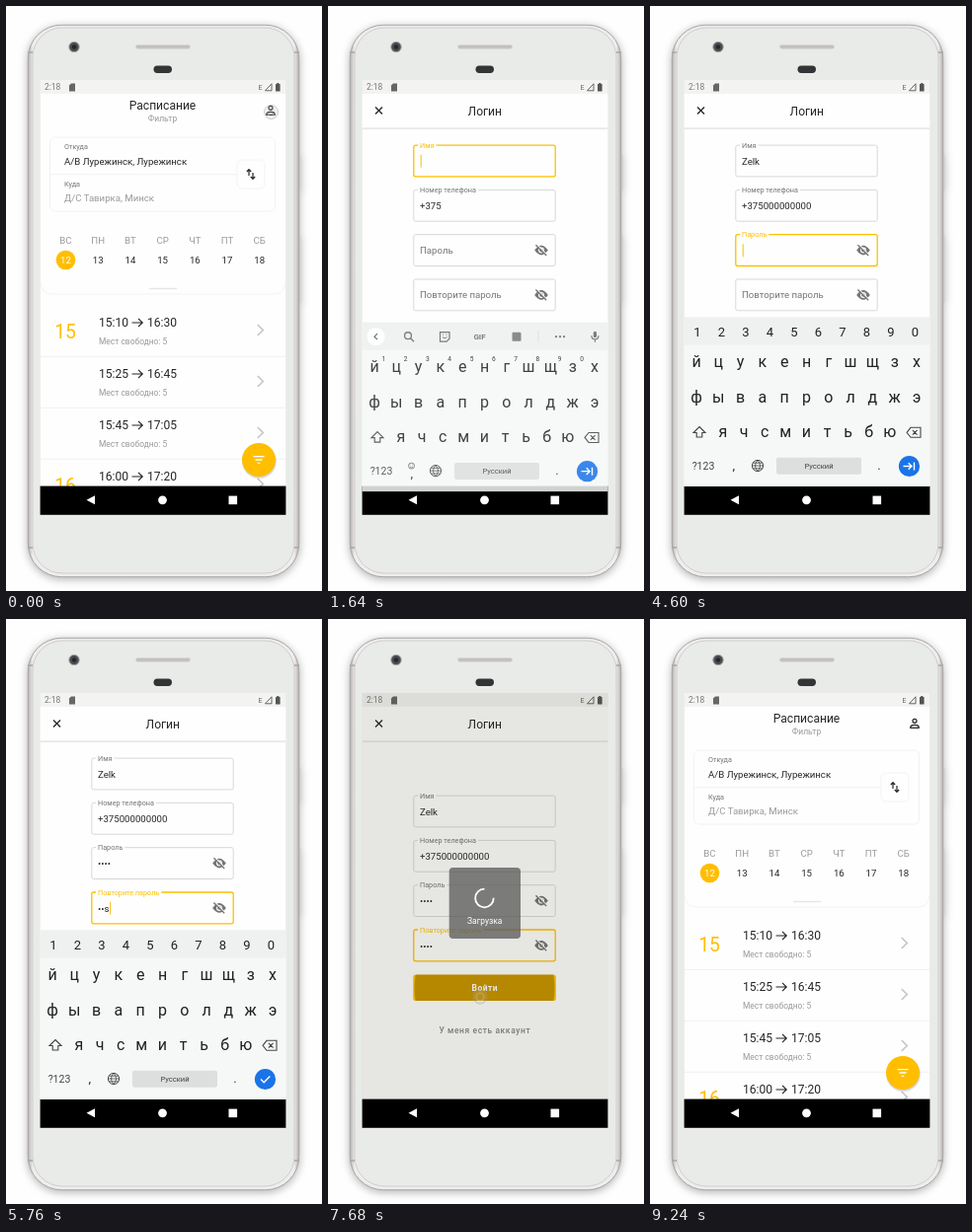
An HTML page for the animation above (10 s loop, 320 px wide and 593 px high).

```html
<!DOCTYPE html>
<html lang="ru">
<head>
<meta charset="utf-8">
<title>Расписание</title>
<style>
html, body { margin: 0; width: 100%; height: 100%; overflow: hidden; background: #fdfefd; }
svg { display: block; width: 100%; height: 100%; font-family: Roboto, sans-serif; }
#body { filter: drop-shadow(0 2px 4px rgba(0,0,0,.3)); }
</style>
</head>
<body>
<svg viewBox="0 0 320 593">
  <defs>
    <clipPath id="screen"><rect x="34.6" y="75" width="248.8" height="412"/></clipPath>
    <clipPath id="button"><rect x="86.3" y="360.5" width="144.5" height="26.5" rx="2.5"/></clipPath>
    <linearGradient id="rim">
      <stop offset="0" stop-color="#b5b0b0"/><stop offset=".018" stop-color="#efeded"/>
      <stop offset=".982" stop-color="#efeded"/><stop offset="1" stop-color="#b5b0b0"/>
    </linearGradient>
  </defs>
  <g id="body">
    <path d="M296.5 151V186M296.5 233V300" stroke="#d2d0d0" stroke-width="4"/>
    <rect x="22.3" y="19.3" width="274.4" height="559.4" rx="34" fill="url(#rim)" stroke="#aaa5a5"/>
  </g>
  <rect x="27" y="22" width="265" height="553" rx="30" fill="#e9ebe8" stroke="#d0cdcd"/>
  <path d="M22 47h5M292 47h5M22 549h5M292 549h5" stroke="#aaa6a6" stroke-width="1.5"/>
  <rect x="131.5" y="39.6" width="55" height="3.6" rx="1.8" fill="#c2bfbe" stroke="#d6d4d3" stroke-width=".8"/>
  <circle cx="69" cy="41.5" r="5.2" fill="#4c4b4d" stroke="#aaa"/><circle cx="69" cy="41.5" r="2.2" fill="#242833"/>
  <rect x="149.5" y="60.5" width="18.5" height="7.5" rx="3.7" fill="#343436"/>
  <g id="live"></g>
</svg>
<script>
const AMBER = '#ffbe00', INK = '#262626', GREY = '#757575', BLUE = '#1a73e8', PAPER = '#fefefe';
const live = document.getElementById('live');
const pen = document.createElement('canvas').getContext('2d');

const ramp = (t, start, span) => Math.min(1, Math.max(0, (t - start) / span));
const mix = (a, b, p) => a + (b - a) * p;
const easeOut = (p, n) => 1 - (1 - p) ** n;
const typed = (str, times, t) => str.slice(0, times.filter(k => t >= k).length);

const text = (x, y, size, str, fill = INK, anchor = 'start', more = '') =>
  `<text x="${x}" y="${y}" font-size="${size}" fill="${fill}" text-anchor="${anchor}" ${more}>${str}</text>`;
const mid = (x, y, size, str, fill, more) => text(x, y, size, str, fill, 'middle', more);
const rect = (x, y, w, h, fill, r = 0, more = '') =>
  `<rect x="${x}" y="${y}" width="${w}" height="${h}" rx="${r}" fill="${fill}" ${more}/>`;
const band = (y, h, fill, more) => rect(34.6, y, 248.8, h, fill, 0, more);
const circle = (x, y, r, fill, more = '') => `<circle cx="${x}" cy="${y}" r="${r}" fill="${fill}" ${more}/>`;
const line = (d, color, width = 1, more = '') =>
  `<path d="${d}" fill="none" stroke="${color}" stroke-width="${width}" ${more}/>`;
const shape = (d, fill) => `<path d="${d}" fill="${fill}"/>`;
const group = (x, y, alpha, inner) => `<g transform="translate(${x} ${y})" opacity="${alpha}">${inner}</g>`;

// ---------- system bars ----------
const statusBar = band(75, 14, '#f3f4f2') + text(39, 85.2, 8.45, '2:18', '#777') +
  shape('M66 78.5H70V86.5H64V80.5Z', '#666') + text(255.5, 85, 7, 'E', '#666') +
  line('M262.5 85.8H269V78.8Z', '#555', .9) + rect(273, 79, 4.6, 7.5, '#555', .6) + rect(274.3, 78, 2, 1.2, '#555');
const navBar = band(486.6, 29.2, '#000') + shape('M81.5 500.8L90 496.3V505.3Z', '#fff') +
  circle(158.5, 500.8, 4.4, '#fff') + rect(225.5, 496.6, 8.6, 8.6, '#fff');

// ---------- schedule ----------
function departure(i) {
  const [from, to, hour] = [['15:10', '16:30', '15'], ['15:25', '16:45'], ['15:45', '17:05'], ['16:00', '17:20', '16']][i];
  return group(0, i * 52, 1,
    (hour ? mid(60, 337, 19.3, hour, AMBER) : '') +
    text(94, 325.3, 12.07, from) + text(143, 325.3, 12.07, to) +
    line('M127.5 321H138M134 316.8L138.2 321L134 325.2', INK, 1.2) +
    text(94, 342.5, 8.45, 'Мест свободно: 5', '#9b9b9b') +
    line('M254.8 323L260.3 328.5L254.8 334', '#c6c6c6', 1.7) + line('M35 355.3H283', '#f1f1f1'));
}
const weekdays = ['ВС', 'ПН', 'ВТ', 'СР', 'ЧТ', 'ПТ', 'СБ'].map((day, i) => {
  const x = 60.5 + i * 32.7;
  return mid(x, 240.6, 9.65, day, '#9a9a9a') + (i ? '' : circle(x, 257.5, 9.8, AMBER)) +
    mid(x, 261, 9.65, 12 + i, i ? INK : '#fff');
}).join('');
const schedule = band(89, 398, PAPER) +
  mid(158.5, 105.3, 12.07, 'Расписание') + mid(158.5, 117.3, 8.45, 'Фильтр', '#9b9b9b') +
  circle(268, 103.3, 2, 'none', `stroke="${INK}" stroke-width="1.2"`) +
  line('M263.8 110.4V109.3Q264.5 107.3 268 107.3T272.2 109.3V110.4Z', INK, 1.2) +
  rect(44.5, 133, 228, 75, 'none', 5, 'stroke="#f2f2f2"') + line('M45 170.8H234', '#f2f2f2') +
  text(59, 145, 7.24, 'Откуда', GREY) + text(59, 160.5, 9.65, 'А/В Лурежинск, Лурежинск') +
  text(59, 182.5, 7.24, 'Куда', GREY) + text(59, 197.8, 9.65, 'Д/С Тавирка, Минск', '#9a9a9a') +
  rect(234, 156, 28, 29, PAPER, 5, 'stroke="#f3f3f3"') +
  line('M246 172V166M243.8 168L246 165.7L248.2 168M250 169V175M247.8 173L250 175.3L252.2 173', INK, 1.2) +
  weekdays + line('M145 286.5H173', '#e6e6e6', 1.4) +
  line('M35 280Q36 292 47 292H271Q282 292 283 280', '#f3f3f3') +
  [0, 1, 2, 3].map(departure).join('') +
  circle(256.5, 462, 17.5, '#000', 'opacity=".08"') + circle(256.3, 461, 17.2, '#000', 'opacity=".1"') +
  circle(256, 460, 17, AMBER) + line('M250.5 456.7H261.5M252.5 460H259.5M254.7 463.3H257.3', '#fff', 1.3);

// ---------- registration form ----------
const eye = shape('M-6.8 0Q0-9.6 6.8 0Q0 9.6-6.8 0Z', GREY) + circle(0, 0, 3, PAPER) + circle(0, 0, 1.8, GREY) +
  line('M-4.6-5.8L6.2 5', PAPER, 1.3) + line('M-5.6-5.4L5.2 5.4', GREY, 1.3);

const FOCUS = [1360, 2760, 4440, 5400, 1e5];
const FIELDS = [
  { label: 'Имя', value: 'Zelk', keys: [1960, 2280, 2400, 2520] },
  { label: 'Номер телефона', value: '+375000000000',
    keys: [0, 0, 0, 0, 3040, 3120, 3200, 3400, 3520, 3680, 3800, 3880, 4000] },
  { label: 'Пароль', value: 'best', keys: [4680, 4800, 4920, 5160], secret: true },
  { label: 'Повторите пароль', value: 'best', keys: [5520, 5640, 5760, 6000], secret: true },
];

function field(i, t) {
  const { label, value, keys, secret } = FIELDS[i];
  const focused = t >= FOCUS[i] && t < FOCUS[i + 1];
  const float = i === 1 ? 1 : easeOut(ramp(t, FOCUS[i] - 20, 167), 2);
  const last = Math.max(FOCUS[i] + 120, ...keys.filter(k => t >= k));
  let shown = typed(value, keys, t);
  if (secret && shown) {
    const plain = focused && t < last + 1500 ? shown.slice(-1) : '';
    shown = '•'.repeat(shown.length - plain.length) + plain;
  }
  pen.font = '7.24px Roboto, sans-serif';
  const gap = pen.measureText(label).width + 4;
  pen.font = '9.65px Roboto, sans-serif';
  const caret = 93.7 + pen.measureText(shown).width;
  const blinkOn = (t - last + 1000) % 1000 < 500;
  const border = focused ? `stroke="${AMBER}" stroke-width="1.3"` : 'stroke="#d4d4d4" stroke-width=".9"';
  return group(0, 195 + i * 45.3, 1,
    rect(86.8, -15.9, 143.4, 31.8, 'none', 2, border) +
    (float > .3 ? rect(91, -17, gap, 2.4, PAPER) : '') +
    text(93, mix(3.5, -13.2, float), mix(9.65, 7.24, float), label, focused ? AMBER : GREY) +
    text(93, 3.6, 9.65, shown) + (secret ? group(216, 0, 1, eye) : '') +
    (focused && blinkOn ? rect(caret, -6.3, 1, 13, AMBER) : ''));
}

function login(t) {
  const expand = .5 - .5 * Math.cos(Math.PI * ramp(t, 760, 300));
  const fade = ramp(t, 820, 260);
  const resized = t >= 1600 && t < 6960;
  const ripple = ramp(t, 7480, 200);
  const rippleAlpha = .22 * (1 - ramp(t, 7860, 240));
  const linkGlow = t < 720 ? 0 : ramp(t, 720, 80) * (1 - ramp(t, 980, 160));
  const button = rect(86.3, 360.5, 144.5, 26.5, AMBER, 2.5) +
    (ripple ? circle(158.5, 374, 71 * ripple, '#000', `opacity="${rippleAlpha}" clip-path="url(#button)"`) : '') +
    mid(158.8, 377, 8.45, 'Войти', '#fff', 'font-weight="700" letter-spacing=".5"') +
    rect(90.5, 404, 139, 26, '#f9f8f0', 2, `opacity="${linkGlow}"`) +
    mid(158.8, 420, 8.45, t < 760 ? 'У меня нет аккаунта' : 'У меня есть аккаунт', '#858585',
      'font-weight="500" letter-spacing=".6"');
  const form = group(0, 0, fade, field(0, t) + field(3, t)) + field(1, t) + field(2, t) +
    group(0, -45 * (1 - expand), 1, button);
  const windowEnd = numeric(t) ? 343 : 315.5;
  return band(89, 431, PAPER) + group(0, resized ? -38 : 0, 1, form) +
    (resized ? band(windowEnd, 487 - windowEnd, PAPER) : '') +
    band(89, 34.5, PAPER) + band(123.3, 1.8, '#e9e9e9') +
    line('M48 102.5L55 109.5M55 102.5L48 109.5', INK, 1.3) + mid(158.8, 110.6, 12.07, 'Логин');
}

// ---------- keyboards ----------
const numeric = t => t >= 2800 && t < 4520;
const keyRow = (keys, x, step, y, size) =>
  [...keys].map((key, i) => mid(x + i * step, y, size, key, '#202124')).join('');
const backspace = (x, y) => group(x, y, 1,
  line('M-7 0L-3-5H7V5H-3ZM-1.2-2.4L3.6 2.4M3.6-2.4L-1.2 2.4', '#444', 1.1));
const enterKey = (x, done) => group(x, 466.5, 1, circle(0, 0, 10.6, BLUE) +
  line(done ? 'M-4.5 0L-1.3 3.3L4.8-3' : 'M-6 0H2.5M-.8-3.3L2.5 0L-.8 3.3M5-4V4', '#fff', 1.4));

const toolbar = circle(48.5, 330, 9, '#fff') + line('M50 327L47 330L50 333', '#555', 1.2) +
  circle(81, 329, 3.4, 'none', 'stroke="#666" stroke-width="1.3"') + line('M83.5 331.5L87 335', '#666', 1.4) +
  line('M113.5 325.5H123V332L120 335H113.5Z', '#666', 1.2) + line('M116 330.5Q118.2 333 120.5 330.5M116 328h1M119.5 328h1', '#666') +
  mid(153.5, 333, 8, 'GIF', '#666', 'font-weight="700"') + rect(186.5, 325.5, 9, 9, '#777', 1) +
  line('M213 324V336', '#ddd') + [231, 235, 239].map(x => circle(x, 330, 1.1, '#666')).join('') +
  rect(268.8, 324.5, 3.2, 6.5, '#666', 1.6) + line('M266.8 329Q267 332.8 270.4 332.8T274 329M270.4 333V335.5', '#666', 1.1);

function letterKeyboard(secret, done) {
  const top = secret ? keyRow('1234567890', 48, 24.5, 334.6, 13) : toolbar;
  const hints = secret ? '' : keyRow('1234567890', 56.3, 22.3, 354.5, 6.6);
  const globe = circle(0, 0, 5.6, 'none', 'stroke="#444"') +
    line('M-5.6 0H5.6M-4.8-2.8H4.8M-4.8 2.8H4.8M0-5.6Q-5 0 0 5.6Q5 0 0-5.6', '#444', .8);
  const smile = secret ? '' : circle(84.5, 461, 3, 'none', 'stroke="#555" stroke-width=".8"') +
    line('M83 462Q84.5 463.6 86 462M83.3 460h.7M85.1 460h.7', '#555', .7);
  return band(315.5, 171.5, '#f6f8f7') + band(315.5, 28, '#eef1f0') + top + hints +
    keyRow('йцукенгшщзх', 47, 22.3, 366.3, 16) + keyRow('фывапролджэ', 47, 22.3, 402.3, 16) +
    keyRow('ячсмитьбю', 74, 21.1, 437.3, 16) +
    line('M50 426.5L56 432.5H52.8V437H47.2V432.5H44Z', '#444', 1.1) + backspace(267, 432.3) +
    mid(54, 470.2, 10.5, '?123', '#444') + mid(84.8, secret ? 470 : 473, 13, ',') + smile + group(109, 466, 1, globe) +
    rect(128, 457.8, 86, 17, '#dcdfde', 2) + mid(171, 468.8, 7.6, 'Русский', '#444') +
    mid(232, 470, 13, '.') + enterKey(262.5, done);
}

function numberKeyboard() {
  const letters = ['', 'ABC', 'DEF', 'GHI', 'JKL', 'MNO', 'PQRS', 'TUV', 'WXYZ'];
  return band(343, 144, '#f6f8f7') + letters.map((abc, i) => {
    const x = 61 + i % 3 * 61.5, y = 371 + Math.floor(i / 3) * 35;
    return mid(x, y, 17, i + 1, '#202124') + mid(x + 20.5, y - 3.6, 7.2, abc, '#666');
  }).join('') + mid(66, 474, 12.5, '* #') + mid(122.5, 475.5, 17, '0') + mid(143, 474, 13, '+') + mid(188.5, 475.5, 17, '.') +
    line('M246.3 365H254M244.5 398V402.5H256V398', '#333', 1.3) + backspace(250, 435) + enterKey(250.5);
}

function keyboard(t) {
  const hidden = t < 4000 ? 1 - easeOut(ramp(t, 1560, 215), 4) : ramp(t, 6900, 160);
  if (hidden >= 1) return '';
  const keys = numeric(t) ? numberKeyboard() : letterKeyboard(t >= 4520, t >= 5440);
  return group(0, 34 * hidden, 1 - hidden, keys);
}

// ---------- loading dialog and touches ----------
function loading(t) {
  const alpha = ramp(t, 7540, 100) * (1 - ramp(t, 8050, 100));
  if (!alpha) return '';
  const angle = 80 + (t - 7680) * .36;
  return group(0, 0, alpha, band(75, 411.6, '#2a2a00', 'opacity=".11"') +
    rect(122.7, 252, 72.3, 72, '#5c5c5c', 4, 'opacity=".77"') +
    `<g transform="translate(158.5 282.9) rotate(${angle})">` + line('M1.5-9.1A9.3 9.3 0 1 1-9.1-1.5', '#fff', 1.8) + '</g>' +
    mid(158.7, 309.3, 8.45, 'Загрузка', '#fff'));
}

const TOUCHES = [[0, 40, 268.5, 107.5], [720, 800, 171, 375], [1320, 1400, 158, 195],
  [6240, 6360, 68, 285.5], [7440, 7680, 154, 383]];
const touches = t => TOUCHES.map(([from, to, x, y]) => {
  const alpha = t < from ? 0 : 1 - ramp(t, to, 140);
  return alpha ? circle(x, y, 7, '#bbb', `fill-opacity=".15" stroke="#999" stroke-opacity=".5" opacity="${alpha}"`) +
    circle(x, y, 4, 'none', `stroke="#ccc" stroke-opacity=".4" opacity="${alpha}"`) : '';
}).join('');

function frame(t) {
  const closing = t > 5000;
  const alpha = closing ? 1 - ramp(t, 9080, 150) : t < 40 ? 0 : easeOut(ramp(t, 20, 200), 4);
  const slide = 33 * (closing ? ramp(t, 8980, 250) ** 4 : 1 - easeOut(ramp(t, 20, 350), 5));
  const page = alpha ? group(0, slide, alpha, login(t)) : '';
  return `<g clip-path="url(#screen)">${schedule}${page}${statusBar}</g>` +
    navBar + keyboard(t) + loading(t) + touches(t);
}

function tick() {
  live.innerHTML = frame(performance.now() % 10000);
  requestAnimationFrame(tick);
}
tick();
</script>
</body>
</html>
```
